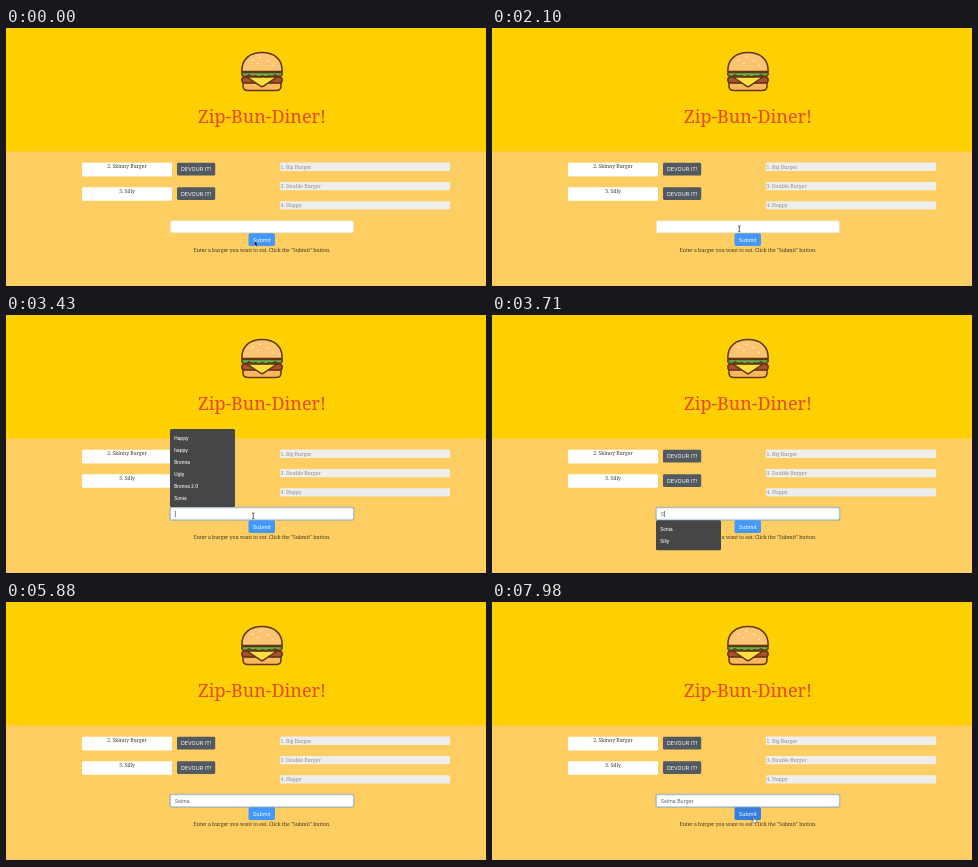
An HTML page for the animation above (8000 ms loop, 480x259 px).

```html
<!DOCTYPE html>
<html lang="en">
<head>
<meta charset="utf-8">
<title>Burger form</title>
<style>
html, body { margin: 0; width: 100%; height: 100%; overflow: hidden; background: #ffce62; }
svg { display: block; width: 480px; height: 259px; }
text { font: 5.4px Inter, "Open Sans", sans-serif; white-space: pre; }
.serif { font: 5px "Noto Serif", serif; fill: #3b3327; }
.mid { text-anchor: middle; }
.white { fill: #fff; }
.done { fill: #8b8b8b; }
#title { font-size: 18px; fill: #e8482a; }
#typed { font-size: 5.2px; fill: #55595f; }
#menu text { font-size: 4.6px; font-weight: 500; fill: #fff; }
</style>
</head>
<body>
<svg id="stage" viewBox="0 0 480 259">
  <rect width="480" height="259" fill="#ffce62"/>
  <rect width="480" height="123.5" fill="#ffd000"/>
  <rect y="258" width="480" height="1" fill="#111"/>

  <g id="burger" stroke="#5f3516" stroke-width="1.5" stroke-linejoin="round" stroke-linecap="round">
    <path d="M237 54.5H275V58Q275 62.6 270 62.6H242Q237 62.6 237 58Z" fill="#fab75c"/>
    <rect x="235.8" y="49" width="40.4" height="6" rx="3" fill="#a9502d"/>
    <path d="M241 49H271L257.5 58.2Q256 59.2 254.5 58.2Z" fill="#ffdf3d"/>
    <path d="M236 44.5H276Q277 48 273.5 48.3Q270.5 48.3 269 46.8Q266.5 49.3 263 47.6Q260 49.8 256.5 47.6Q253 49.8 249.5 47.6Q246 49.4 243 46.8Q241 48.8 238 48.3Q235 47.8 236 44.5Z" fill="#63b34c"/>
    <path d="M235.8 43.6C235.5 31 244 24.6 256 24.6S276.5 31 276.2 43.6Z" fill="#fbc470"/>
    <path d="M246 32.6l1.4-.8M253.5 29.2h1.6M261 32.2l1.4.8M251 35.8l1.3-.6M266.5 36.8l1 .9" fill="none" stroke="#fff0c8" stroke-width="1.1"/>
  </g>
  <text id="title" class="serif mid" x="256" y="95">Zip-Bun-Diner!</text>

  <g id="lists"></g>
  <text class="serif mid" x="256" y="223.8">Enter a burger you want to eat. Click the "Submit" button.</text>

  <rect id="glow" x="163.4" y="191.8" width="185" height="14" rx="2.2" fill="#007bff" fill-opacity=".32"/>
  <rect id="field" x="164.4" y="192.8" width="183" height="12" rx="1.5" fill="#fff" stroke="#dfd9cc" stroke-width=".6"/>
  <text id="typed" x="168.7" y="200.7"></text>
  <rect id="caret" y="196" width=".6" height="6" fill="#333"/>

  <rect id="submit" x="242.5" y="205.2" width="26.5" height="12.8" rx="1.6" fill="#4298fb"/>
  <text class="white mid" x="255.7" y="213.6">Submit</text>

  <g id="menu"></g>

  <circle id="ring" cx="247.3" cy="200.6" r="6.6" fill="#fff" fill-opacity=".55" stroke="#111" stroke-width="1.2"/>
  <g id="pointer">
    <path id="arrow" d="M0 0V5.4L1.3 4.3L2.2 6.2L3.1 5.8L2.3 3.9H3.9Z" fill="#111" stroke="#fff" stroke-width=".35"/>
    <path id="beam" d="M-1.2-3Q0-3 0-2.2Q0-3 1.2-3M0-2.2V2.2M-1.2 3Q0 3 0 2.2Q0 3 1.2 3" fill="none" stroke="#222" stroke-width=".7"/>
    <path id="hand" d="M-.6 0Q0-.6.6 0V2L2.6 2.5Q3.2 2.8 3 3.8L2.4 5.8H-.6L-2 3.6Q-1.8 2.9-.6 3.7Z" fill="#fff" stroke="#222" stroke-width=".45"/>
  </g>
</svg>
<script>
const LOOP = 8000, BLINK = 490, FOCUS = 2310;
const $ = id => document.getElementById(id);
const show = (id, on) => $(id).setAttribute("visibility", on ? "visible" : "hidden");
const rect = (x, y, w, h, fill, r = 1.4) =>
  `<rect x="${x}" y="${y}" width="${w}" height="${h}" rx="${r}" fill="${fill}"/>`;
const label = (x, y, text, cls = "") => `<text x="${x}" y="${y}" class="${cls}">${text}</text>`;

const waiting = ["2. Skinny Burger", "5. Silly"];
const eaten = ["1. Big Burger", "3. Double Burger", "4. Happy"];
$("lists").innerHTML =
  waiting.map((name, i) => {
    const y = 134.8 + i * 24.4;
    return rect(76, y, 90, 13.6, "#fff", 1) + label(121, y + 5.6, name, "serif mid") +
      rect(171, y, 38.2, 12.8, "#525960") + label(190.1, y + 8.4, "DEVOUR IT!", "white mid");
  }).join("") +
  eaten.map((name, i) => {
    const y = 134.6 + i * 19.3;
    return rect(274, y, 170, 8.4, "#eeeeec", 1) + label(274.6, y + 5.9, name, "serif done");
  }).join("");

const history = ["Happy", "happy", "Brenna", "Ugly", "Brenna 2.0", "Sonia"];
const matches = ["Sonia", "Silly"];
const phrase = "Selma Burger";
const keys = [3640, 4340, 4830, 5250, 5390, 6230, 6440, 6650, 6720, 6930, 7000, 7070];

// pointer stops: time, x, y
const path = [
  [0, 248.4, 212.8], [420, 257, 211], [840, 254.5, 206.5], [910, 247.3, 200.8],
  [7490, 247.3, 200.8], [7910, 261.8, 215.2], [LOOP, 261.8, 215.2]
];

function pointerAt(t) {
  const i = path.findIndex(p => p[0] > t);
  const [t0, x0, y0] = path[i - 1], [t1, x1, y1] = path[i];
  const k = (t - t0) / (t1 - t0), e = k * k * (3 - 2 * k);
  return [x0 + (x1 - x0) * e, y0 + (y1 - y0) * e];
}

let menuItems;
function setMenu(items, top) {
  if (menuItems === items) return;
  menuItems = items;
  $("menu").innerHTML = items ? rect(164, top, 65, items.length * 12 + 6, "#444648", 1.5) +
    items.map((s, i) => label(168.3, top + 10.7 + i * 12, s)).join("") : "";
}

function draw(t) {
  const count = keys.filter(k => k <= t).length;
  const focused = t >= FOCUS;
  const typed = $("typed"), text = phrase.slice(0, count);
  if (typed.textContent !== text) typed.textContent = text;

  const lastKey = count ? keys[count - 1] : 2450;
  $("caret").setAttribute("x", 168.9 + (count ? typed.getComputedTextLength() : 0));
  show("caret", focused && (t - lastKey) % (2 * BLINK) < BLINK);

  const glow = Math.min(1, Math.max(0, (t - FOCUS - 50) / 150));
  $("glow").setAttribute("opacity", glow);
  $("field").setAttribute("stroke", glow > .5 ? "#8fb4dc" : "#dfd9cc");

  if (t < FOCUS || count > 1) setMenu(null);
  else if (count) setMenu(matches, 205.3);
  else setMenu(history, 114);

  const [x, y] = pointerAt(t);
  const late = t >= 7490, onButton = late && y > 205.2;
  $("pointer").setAttribute("transform", `translate(${x} ${y})`);
  show("arrow", t < 1610);
  show("beam", t >= 1610 && t < keys[0] || late && !onButton);
  show("hand", onButton);
  show("ring", t >= 1050 && t < 1610 || t >= 2240 && t < 3220);
  $("submit").setAttribute("fill", onButton ? "#347fe0" : "#4298fb");
}

const start = performance.now();
function frame() {
  draw((performance.now() - start) % LOOP);
  requestAnimationFrame(frame);
}
frame();
</script>
</body>
</html>
```
